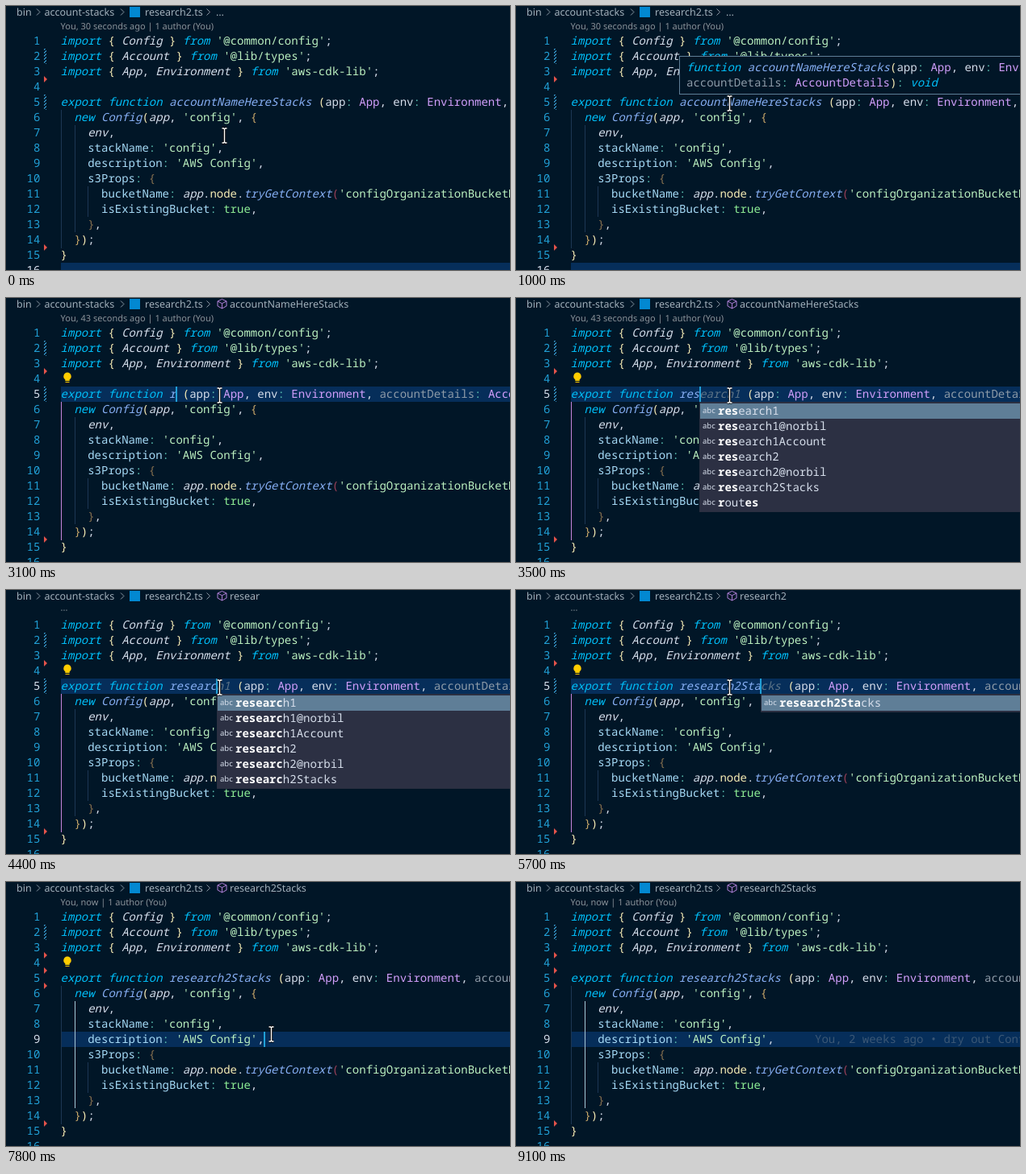
An HTML page for the animation above (9300 ms loop, 624 by 328 pixels).

```html
<!DOCTYPE html>
<html lang="en">
<head>
<meta charset="utf-8">
<title>Renaming a function</title>
<style>
  html, body { margin: 0; width: 100%; height: 100%; overflow: hidden; background: #011627; }
  #stage {
    position: relative; width: 624px; height: 328px; overflow: hidden;
    background: #011627; color: #d6deeb;
    font: 14px/19px "Noto Sans Mono", monospace;
    text-rendering: geometricPrecision; font-variant-ligatures: none;
  }
  #stage div, svg { position: absolute; white-space: pre; }
  b { font-weight: 400; }
  .row { left: 67.6px; height: 19px; }
  .num { left: 0; width: 42.4px; text-align: right; color: #219fd5; }
  .num.on { color: #d6deeb; }
  .k { color: #00bff9; font-style: italic; }
  .i { font-style: italic; }
  .f { color: #87aff4; font-style: italic; }
  .t { color: #d29ffc; }
  .s { color: #bcf0c0; }
  .q { color: #a7dbf7; }
  .c { color: #5abeb0; }
  .y { color: #f7ecb5; }
  .n { color: #8dec95; }
  .g { color: #c9a86a; }
  .h { color: #86704f; }
  .r { color: #9c4058; }
  .u { color: #8e9ba8; }
  .w { color: #5d7487; font-style: italic; }
  .crumb { top: -1px; font: 12.5px/17px "Noto Sans", sans-serif; color: #a3b0bb; }
  #lens { left: 67.6px; top: 18px; font: 11px/15px "Noto Sans", sans-serif; color: #8b9299; }
  #mark { left: 68px; width: 556px; height: 19px; background: #062e5a; }
  #sel { left: 202px; top: 110px; width: 176px; height: 19px; background: #1d3f73; }
  #caret { width: 2px; height: 19px; background: #219fd5; }
  #blame { left: 370px; top: 186px; color: #3b5775; }
  #hover {
    left: 202px; top: 62px; width: 500px; height: 38px; padding: 4px 8px;
    background: #011627; border: 1px solid #5f7e97;
  }
  #list { top: 129px; width: 460px; padding: 1px 0; background: #2c3043; border: 1px solid #2b2f40; }
  #list p { margin: 0; height: 19px; padding-left: 22px; position: relative; }
  #list p:first-child { background: #5f7e97; }
  #list p::before { content: "abc"; position: absolute; left: 3px; font: 9.5px/18px "Noto Sans", sans-serif; }
  #list b { font-weight: 700; color: #fff; }
  .edit {
    left: 47px; width: 3px; height: 19px;
    background: repeating-linear-gradient(-45deg, #2f86b5 0 1.4px, #011627 1.4px 2.8px);
  }
</style>
</head>
<body>
<div id="stage">
  <div id="mark"></div>
  <div id="sel"></div>
  <div id="code"></div>
  <div id="blame">You, 2 weeks ago • dry out Config</div>
  <div class="edit" style="top:53px"></div>
  <div class="edit" id="edit5" style="top:110px"></div>
  <div class="crumb" style="left:13px">bin</div>
  <div class="crumb" style="left:47.5px">account-stacks</div>
  <div class="crumb" style="left:172px">research2.ts</div>
  <div class="crumb" id="crumb"></div>
  <div id="lens"></div>
  <svg width="624" height="328" fill="none">
    <path d="M38 3.5l4 4-4 4M142 3.5l4 4-4 4M248.500 3.500l4 4-4 4" stroke="#8a98a4"/>
    <rect x="153" y="1" width="13" height="13" fill="#0288d1"/>
    <path id="cube" d="M267.500 1.500l5.500 2.500v6l-5.500 3-5.500-3v-6zM262 4l5.500 2.800 5.500-2.800M267.500 6.800v6" stroke="#b180d7"/>
    <g stroke="#1c3654">
      <path id="outer" d="M68.500 129v172"/>
      <path id="inner" d="M85.500 148v133"/>
      <path d="M101.500 224v38"/>
    </g>
    <g fill="#e5534b">
      <path d="M47 87l4 4-4 4zM47 296l4 4-4 4z"/>
      <path id="cuts" d="M47 106l4 4-4 4zM47 125l4 4-4 4z"/>
    </g>
    <g id="bulb">
      <path d="M76 92.500a4.800 4.800 0 0 1 2.700 8.700v1.800h-5.400v-1.800a4.800 4.800 0 0 1 2.700-8.700z" fill="#fc0"/>
      <path d="M73.500 104.500h5" stroke="#fc0"/>
    </g>
  </svg>
  <div id="caret"></div>
  <div id="hover"></div>
  <div id="list"></div>
  <svg width="624" height="328" fill="none">
    <g id="mouse">
      <path d="M-3-9h2l1 1 1-1h2M-3 9h2l1-1 1 1h2M0-8v16" stroke="#000" stroke-width="3.200"/>
      <path d="M-3-9h2l1 1 1-1h2M-3 9h2l1-1 1 1h2M0-8v16" stroke="#fff" stroke-width="1.400"/>
    </g>
  </svg>
</div>
<script>
(() => {
const LOOP = 9300, LEFT = 67.6, CH = 8.4;
const $ = id => document.getElementById(id);
const show = (id, on) => { $(id).style.display = on ? '' : 'none'; };
const rowTop = row => 34 + 19 * (row - 1);
// "[k text]" becomes a span of class k
const paint = s => s.replace(/\[(\w) ([^\]]*)\]/g, '<b class="$1">$2</b>');

const lines = [
  "[k import] [y {] [i Config] [y }] [k from] [s '@common/config'];",
  "[k import] [y {] [i Account] [y }] [k from] [s '@lib/types'];",
  "[k import] [y {] [i App], [i Environment] [y }] [k from] [s 'aws-cdk-lib'];",
  "",
  "",
  "  [k new] [f Config][y (][i app], [s 'config'], [g {]",
  "    [i env],",
  "    [q stackName][c :] [s 'config'],",
  "    [q description][c :] [s 'AWS Config'],",
  "    [q s3Props][c :] [h {]",
  "      [q bucketName][c :] [i app].[y node].[f tryGetContext][r (][s 'configOrganizationBucketName'][r )],",
  "      [q isExistingBucket][c :] [n true],",
  "    [h }],",
  "  [g }][y )];",
  "[y }]",
  ""
];
const params = "[y (]app[c :] [t App], env[c :] [t Environment], ";
$('code').innerHTML = lines.map((s, i) =>
  `<div class="num" id="n${i + 1}" style="top:${rowTop(i + 1)}px">${i + 1}</div>` +
  `<div class="row" id="r${i + 1}" style="top:${rowTop(i + 1)}px">${paint(s)}</div>`).join('');
$('hover').innerHTML = paint("[k function] [f accountNameHereStacks]" + params +
  "\n[u accountDetails][c :] [t AccountDetails][y )][c :] [k void]");

const words = ['research1', 'research1@norbil', 'research1Account', 'research2', 'research2@norbil',
  'research2Stacks', 'routes', 'region', 'remove', 'render', 'require', 'return'];

// Bold the typed letters in order; null when they do not all occur
function match(word, typed) {
  let k = 0;
  const html = [...word].map(c => c === typed[k] ? (k++, `<b>${c}</b>`) : c).join('');
  return k === typed.length ? html : null;
}

const old = 'accountNameHereStacks';
const steps = [
  [0, { name: old, row: 16, col: 0, caret: 0, mark: 1, sel: 0, list: 0, hover: 0, bulb: 0, cuts: 0, blame: 0,
        crumb: '…', lens: 'You, 30 seconds ago' }],
  [900, { hover: .4 }],
  [1000, { hover: 1 }],
  [1600, { hover: 0, row: 5, col: 23, caret: 1 }],
  [1800, { sel: 1, mark: 0, col: 37 }],
  [1900, { crumb: old }],
  [2000, { lens: 'You, 43 seconds ago' }],
  [2100, { bulb: 1 }],
  [2300, { caret: 0 }],
  [2400, { hover: 1 }],
  [2800, { caret: 1 }],
  [3100, { hover: 0, sel: 0, mark: 1, name: 'r' }],
  [3200, { name: 're', list: 1 }],
  [3500, { name: 'res' }],
  [3600, { name: 'rese' }],
  [3700, { name: 'resea', lens: '' }],
  [3800, { name: 'resear' }],
  [4200, { crumb: 'resear' }],
  [4300, { name: 'researc' }],
  [4500, { name: 'research' }],
  [4800, { crumb: 'research' }],
  [4900, { name: 'research2' }],
  [5200, { crumb: 'research2' }],
  [5400, { name: 'research2S' }],
  [5600, { name: 'research2St' }],
  [5700, { name: 'research2Sta' }],
  [5900, { name: 'research2Stac' }],
  [6000, { name: 'research2Stack' }],
  [6100, { name: 'research2Stacks', list: 0 }],
  [6300, { cuts: 1 }],
  [6500, { crumb: 'research2Stacks' }],
  [6600, { caret: 0 }],
  [7100, { caret: 1 }],
  [7400, { lens: 'You, now' }],
  [7600, { caret: 0 }],
  [7800, { row: 9, col: 30, caret: 1 }],
  [8000, { blame: 1, bulb: 0 }],
  [8300, { caret: 0 }],
  [8800, { caret: 1 }],
  [9000, { caret: 0 }]
];

// Pointer path: time, x, y
const path = [[200, 270.5, 161], [600, 264.5, 121], [7300, 264.5, 121], [7700, 328.5, 189],
  [7900, 328.5, 189], [8300, 142, 33], [8500, 42, 1], [8600, 20, -30]];

function pointer(t) {
  t = Math.floor(t / 100) * 100;
  if (t <= path[0][0]) return path[0].slice(1);
  const i = path.findIndex(p => p[0] >= t);
  if (i < 0) return [20, -30];
  const [t0, x0, y0] = path[i - 1], [t1, x1, y1] = path[i];
  const u = (t - t0) / (t1 - t0), e = u * u * (3 - 2 * u);
  return [x0 + (x1 - x0) * e, y0 + (y1 - y0) * e];
}

function render(s) {
  const found = s.list ? words.filter(w => match(w, s.name)) : [];
  const ghost = found.length ? found[0].slice(s.name.length) : '';
  $('r5').innerHTML = paint(`[k export function] [f ${s.name}]` + (ghost && `[w ${ghost}]`) +
    ' ' + params + '[u accountDetails][c :] [t AccountDetails]');

  const col = s.row === 5 && s.name !== old ? 16 + s.name.length : s.col;
  const x = LEFT + col * CH;
  $('caret').style.left = Math.floor(x + .01) + 'px';
  $('caret').style.top = $('mark').style.top = rowTop(s.row) + 'px';
  $('list').style.left = Math.round(x) + 'px';
  $('list').innerHTML = found.map(w => `<p>${match(w, s.name)}</p>`).join('');
  $('hover').style.opacity = s.hover;
  for (const id of ['caret', 'mark', 'sel', 'list', 'hover', 'bulb', 'cuts', 'blame']) show(id, s[id]);
  show('edit5', !s.cuts);
  show('cube', s.crumb !== '…');

  $('crumb').textContent = s.crumb;
  $('crumb').style.left = (s.crumb === '…' ? 260 : 277) + 'px';
  $('lens').textContent = s.lens ? s.lens + ' | 1 author (You)' : '···';
  lines.forEach((_, i) => $('n' + (i + 1)).classList.toggle('on', i + 1 === s.row));
  $('outer').style.stroke = s.row === 5 ? '#c586dc' : '';
  $('inner').style.stroke = s.row === 9 ? '#a9c6d6' : '';
}

const start = performance.now();
let last = -1;
function tick() {
  const t = (performance.now() - start) % LOOP;
  const n = steps.filter(s => s[0] <= t).length;
  if (n !== last) {
    render(Object.assign({}, ...steps.slice(0, n).map(s => s[1])));
    last = n;
  }
  $('mouse').setAttribute('transform', `translate(${pointer(t)})`);
  requestAnimationFrame(tick);
}
tick();
})();
</script>
</body>
</html>
```
